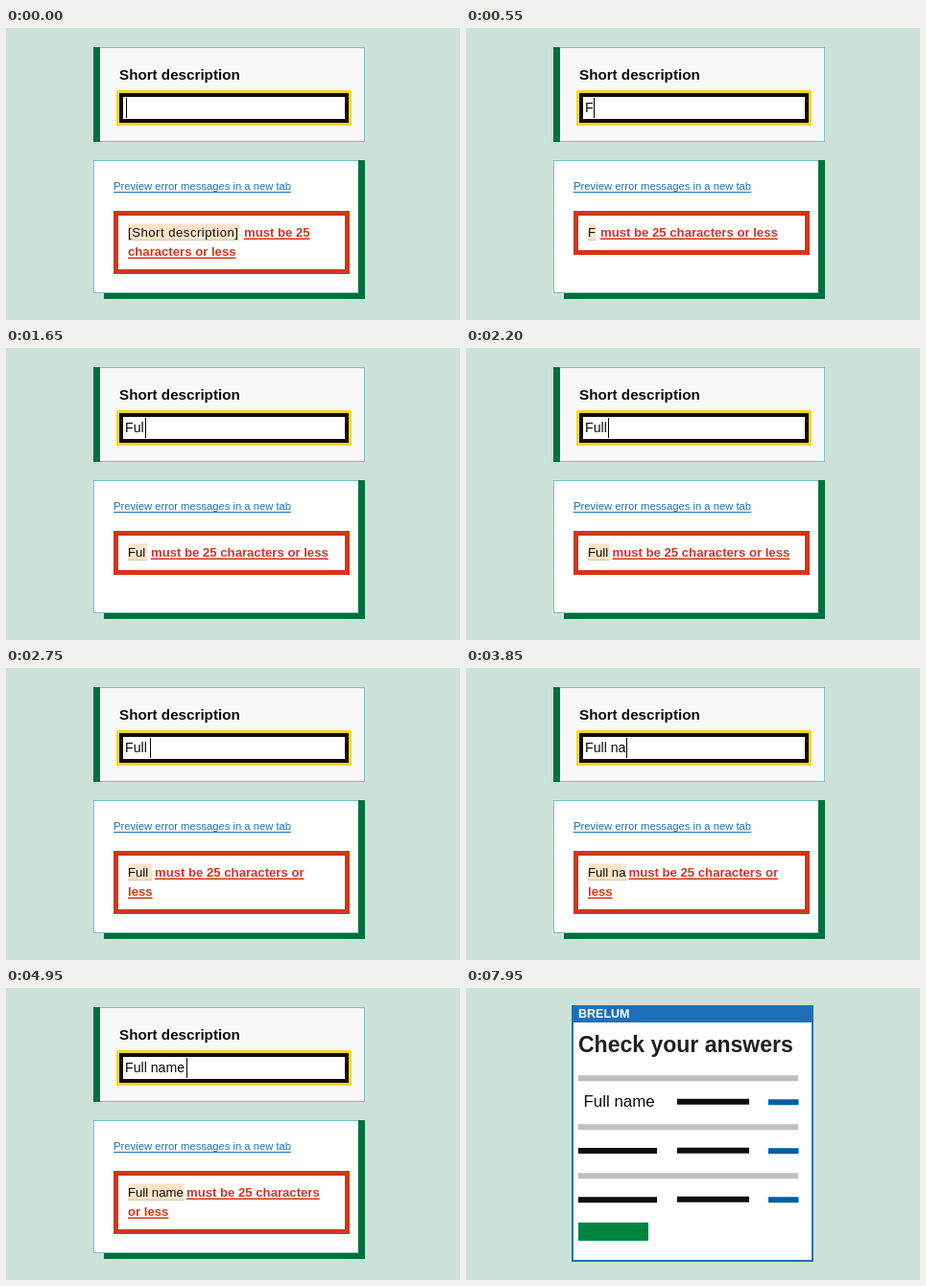
An HTML page for the animation above (8 s loop, 473 px wide and 305 px high).

```html
<!DOCTYPE html>
<html lang="en">
<head>
<meta charset="utf-8">
<title>Short description form</title>
<style>
  html, body { margin: 0; width: 100%; height: 100%; overflow: hidden; background: #cce2d8; }
  svg { display: block; width: 100vw; height: 100vh; }
  text { font-family: "Liberation Sans", Arial, sans-serif; fill: #0b0c0c; white-space: pre; }
  .bold { font-weight: 700; }
  .error text { font-size: 13.15px; }
  .error .bold, .error .rule { fill: #d4351c; }
</style>
</head>
<body>
<svg viewBox="0 0 473 305">
  <rect width="473" height="305" fill="#cce2d8"/>

  <g id="form">
    <rect x="91.5" y="20.5" width="282" height="98" fill="#f8f8f8" stroke="#7cc0c0"/>
    <rect x="91" y="20" width="7" height="99" fill="#00703c"/>
    <text class="bold" x="118" y="54" font-size="15.2">Short description</text>
    <rect x="115" y="65" width="245" height="37" fill="#fbd81f"/>
    <rect x="118" y="68" width="239" height="31" fill="#0b0c0c"/>
    <rect x="122" y="72" width="231" height="23" fill="#fff"/>
    <text id="typed" x="124" y="88" font-size="14.15"></text>
    <rect id="caret" y="73" width="1" height="21"/>

    <path d="M367 138h7v145H102v-7h265z" fill="#00703c"/>
    <rect x="91.5" y="138.5" width="276" height="138" fill="#fff" stroke="#7cc0c0"/>
    <rect x="367" y="138" width="7" height="145" fill="#00703c"/>
    <text x="112" y="169" font-size="11.25" style="fill:#1d70b8">Preview error messages in a new tab</text>
    <rect x="112" y="171" width="185" height="1" fill="#1d70b8"/>

    <g class="error">
      <rect id="box" x="114.5" y="193.5" width="241" fill="none" stroke="#d4351c" stroke-width="5"/>
      <rect id="mark" x="127" y="204" height="17" fill="#fde4ca"/>
      <rect id="markRule" x="127" y="221" height="1" fill="#d9c3a8"/>
      <text id="subject" x="127" y="218"></text>
      <rect id="rule1" class="rule" y="219.5" height="1.5"/>
      <text id="line1" class="bold" y="218"></text>
      <rect id="rule2" class="rule" x="127" y="239.5" height="1.5"/>
      <text id="line2" class="bold" x="127" y="238"></text>
    </g>
  </g>

  <g id="summary">
    <rect x="111" y="19" width="250" height="266" fill="#fff" stroke="#1d70b8" stroke-width="2"/>
    <rect x="110" y="18" width="252" height="18" fill="#1d70b8"/>
    <text class="bold" x="117" y="31" font-size="12.5" style="fill:#fff">BRELUM</text>
    <text class="bold" x="117" y="67" font-size="23" style="fill:#231f20">Check your answers</text>
    <path d="M117 94.3h229M117 145.3h229M117 196.3h229" stroke="#bfbfbf" stroke-width="6"/>
    <text x="122.5" y="124" font-size="16.9">Full name</text>
    <path d="M220 118.8h75M117 170h82M220 169.8h75M117 221.2h82M220 220.8h75" stroke="#0b0c0c" stroke-width="6"/>
    <path d="M315 119.2h31.5M315 170.2h31.5M315 221.2h31.5" stroke="#005ea5" stroke-width="6"/>
    <rect x="117" y="245" width="73" height="19" fill="#00853f"/>
  </g>
</svg>

<script>
const LOOP = 8000, KEY_MS = 550, SUMMARY_AT = 7950;
const NAME = "Full name";
const WORDS = ["must be 25", "characters", "or", "less"];

// per typed length: caret x, highlight end, message start, words on first line
const STEPS = [
  [125, 243, 248, 1],
  [133, 135.5, 140, 4],
  [141, 143, 147.5, 4],
  [145, 147, 151, 4],
  [148, 150, 152.5, 4],
  [150, 152, 155, 3],
  [159, 160, 162.5, 3],
  [167, 167, 169.5, 3],
  [178, 178.5, 181, 2],
  [188, 185.5, 188, 2]
];

const el = id => document.getElementById(id);
const set = (id, name, value) => el(id).setAttribute(name, value);

function underline(textId, ruleId) {
  const text = el(textId);
  set(ruleId, "width", text.textContent ? text.getComputedTextLength() : 0);
}

function showStep(n) {
  const [caret, markEnd, start, count] = STEPS[n];
  const typed = NAME.slice(0, n);
  el("typed").textContent = typed;
  set("caret", "x", caret);
  el("subject").textContent = typed || "[Short description]";
  el("subject").style.letterSpacing = n ? "0" : "0.5px";
  set("mark", "width", markEnd - 127);
  set("markRule", "width", markEnd - 127);
  set("line1", "x", start);
  set("rule1", "x", start);
  el("line1").textContent = WORDS.slice(0, count).join(" ");
  el("line2").textContent = WORDS.slice(count).join(" ");
  set("box", "height", count < WORDS.length ? 61 : 41);
  underline("line1", "rule1");
  underline("line2", "rule2");
}

let shown = -1;
function render(time) {
  const t = time % LOOP;
  const done = t >= SUMMARY_AT;
  const n = Math.min(Math.floor(t / KEY_MS), NAME.length);
  el("form").style.display = done ? "none" : "";
  el("summary").style.display = done ? "" : "none";
  if (!done && n !== shown) showStep(shown = n);
}

function tick() {
  render(performance.now());
  requestAnimationFrame(tick);
}
tick();
</script>
</body>
</html>
```
